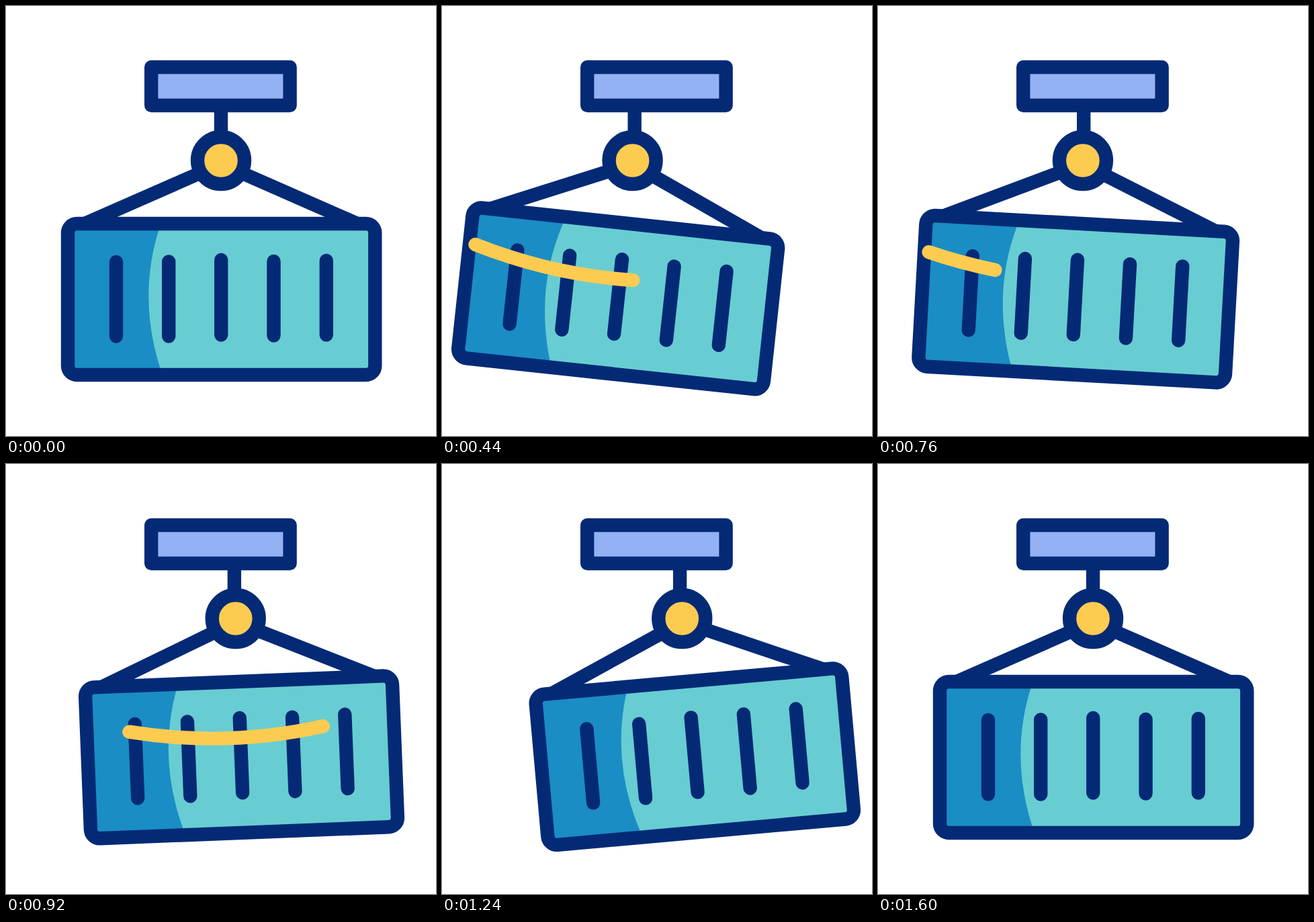
Recreate the animation shown at these times as an HTML page. Size 640 px wide and 640 px high, loop 2000 ms.

```html
<!DOCTYPE html>
<html lang="en">
<head>
<meta charset="utf-8">
<title>Swinging container</title>
<style>
  html, body { margin: 0; width: 100%; height: 100%; overflow: hidden; background: #fff; }
  svg { display: block; width: 100vw; height: 100vh; }
  .line { fill: none; stroke: #042a76; stroke-width: 20.4; stroke-linecap: round; stroke-linejoin: round; }
</style>
</head>
<body>
<svg viewBox="0 0 640 640">
  <path id="rod" class="line" d="M320 150V200"/>
  <rect class="line" x="216.2" y="91" width="206.4" height="57" style="fill:#94b1f4"/>
  <g id="load">
    <path class="line" d="M288 249L118 323.6M352 249L522 323.6"/>
    <rect x="92" y="324" width="457.3" height="225" rx="13.5" fill="#67cdd2"/>
    <path d="M96 330H228.5Q194.8 434 231 544H96Z" fill="#1a8dc4"/>
    <rect class="line" x="92" y="324" width="457.3" height="225" rx="13.5"/>
    <path class="line" d="M164 381V491.5M242.2 380.5V491.5M320.2 378V489.5M398.5 380V490.5M476.8 379V489.5"/>
    <g fill="none" stroke="#fecb51" stroke-width="20.4" stroke-linecap="round">
      <path id="sweepLeft"/>
      <path id="sweepRight"/>
    </g>
  </g>
  <circle id="ring" class="line" cx="320" cy="230" r="35" style="fill:#fecb51"/>
</svg>
<script>
  const LOOP = 2000, STEP = 40, END = 1600;
  const el = id => document.getElementById(id);
  const rod = el('rod'), load = el('load'), ring = el('ring');
  const sweepLeft = el('sweepLeft'), sweepRight = el('sweepRight');

  // Eased progress of t between two times, 0..1
  function ease(t, from, to) {
    const u = Math.min(1, Math.max(0, (t - from) / (to - from)));
    return u * u * (3 - 2 * u);
  }

  // Rest -> left extreme -> right extreme -> rest
  function swing(t, left, right, turn) {
    return left * ease(t, 0, 560)
      + (right - left) * ease(t, 560, turn)
      - right * ease(t, turn, END);
  }

  // Point of the sagging streak curve; a !== b gives the control point between them
  const streakX = [98.5, 323.25, 548];
  const streakY = [378.7, 441.2, 369];
  function blossom(p, a, b) {
    return p[0] * (1 - a) * (1 - b) + p[1] * (a + b - 2 * a * b) + p[2] * a * b;
  }
  const point = (a, b) =>
    blossom(streakX, a, b).toFixed(2) + ' ' + blossom(streakY, a, b).toFixed(2);

  function setStreak(path, a, b) {
    path.setAttribute('d', b - a < 0.0005 ? ''
      : `M${point(a, a)}Q${point(a, b)} ${point(b, b)}`);
  }

  function draw(time) {
    const t = Math.floor((time % LOOP) / STEP) * STEP;
    const shift = swing(t, -41.3, 45.3, 1108);
    const angle = swing(t, 6.95, -6.05, 1120);

    rod.setAttribute('transform', `translate(${shift * 0.915} 0)`);
    ring.setAttribute('transform', `translate(${shift} 0)`);
    load.setAttribute('transform', `translate(${shift} 0) rotate(${angle} 320 230)`);

    setStreak(sweepLeft, 1 - ease(t, 32, 457), 1 - ease(t, 245, 655));
    setStreak(sweepRight, ease(t, 829, 1239), ease(t, 632, 1051));
  }

  const start = performance.now();
  function tick() {
    draw(performance.now() - start);
    requestAnimationFrame(tick);
  }
  tick();
</script>
</body>
</html>
```
